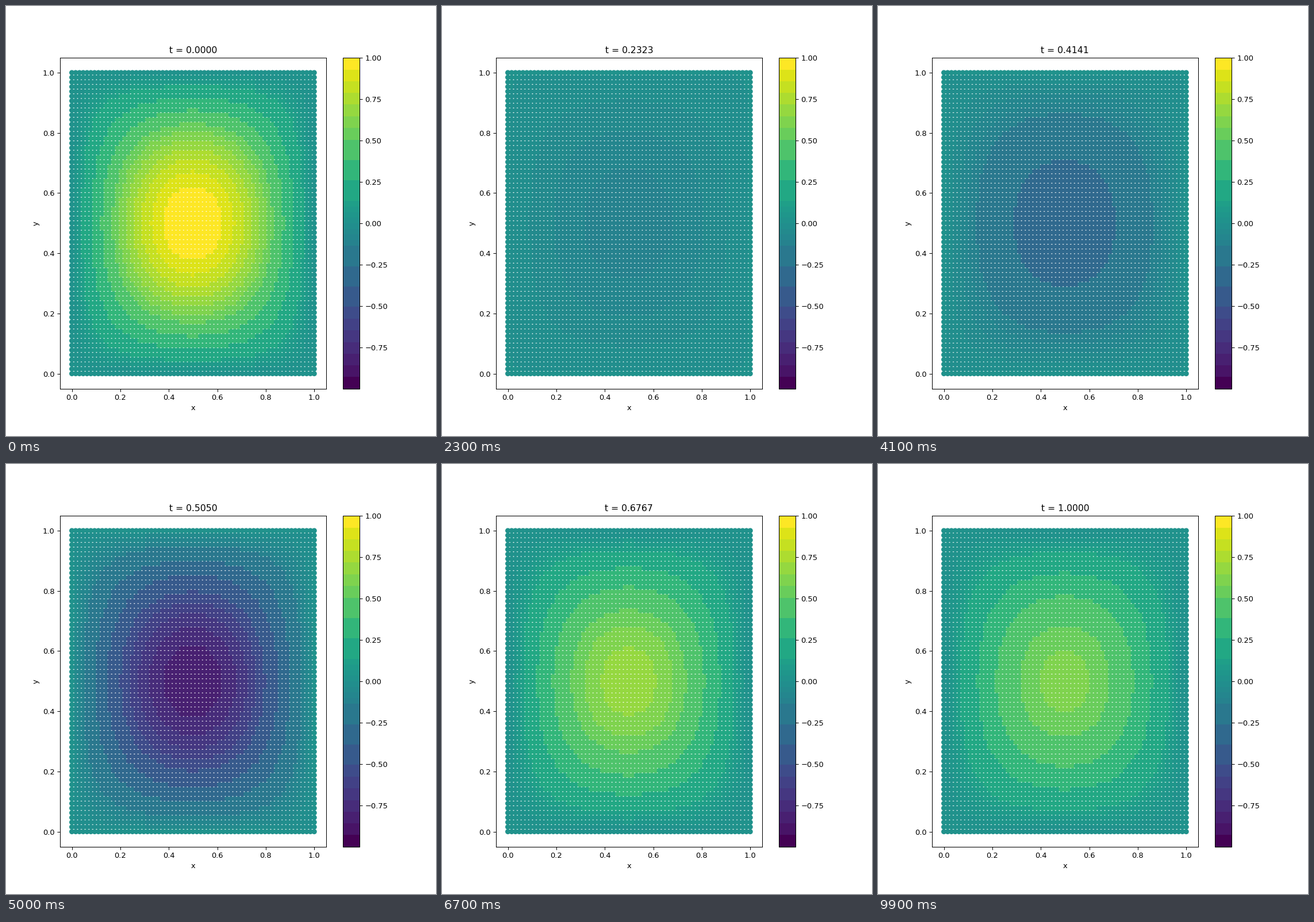
Animation of 748 by 748 pixels, one loop 10 s. Source, as a matplotlib script:

```python
import numpy as np
import matplotlib.pyplot as plt
from matplotlib.animation import FuncAnimation
from matplotlib.colors import ListedColormap, Normalize

FRAMES, INTERVAL = 100, 100
CELLS = 64
OMEGA = 19.77
V_MIN, V_MAX = -0.998, 1.0


def band_edges():
    """Even steps inside a few ranges: fine near zero, coarse beside it."""
    low = np.linspace(0, 0.135, 5)
    mid = np.linspace(0.135, 0.505, 4)
    high = np.linspace(0.505, 1, 8)
    half = np.concatenate([low, mid[1:], high[1:]])
    return np.concatenate([-half[:0:-1], half])


def stepped_viridis(n=1024):
    edges = band_edges()
    mids = (edges[:-1] + edges[1:]) / 2
    mids[0], mids[-1] = V_MIN, V_MAX
    values = np.linspace(V_MIN, V_MAX, n)
    band = np.searchsorted(edges[1:-1], values)
    return ListedColormap(plt.cm.viridis(Normalize(V_MIN, V_MAX)(mids[band])))


def grid_points():
    """Grid nodes with the rim last, so that it is painted on top."""
    j, i = np.divmod(np.arange((CELLS + 1) ** 2), CELLS + 1)
    rim = (i % CELLS == 0) | (j % CELLS == 0)
    order = np.argsort(rim, kind="stable")
    return i[order] / CELLS, j[order] / CELLS


x, y = grid_points()
mode = np.sin(np.pi * x) * np.sin(np.pi * y)

plt.rcParams["font.family"] = "DejaVu Sans"
fig, ax = plt.subplots(figsize=(8, 8), dpi=93.5)
dots = ax.scatter(x, y, c=mode, cmap=stepped_viridis(),
                  vmin=V_MIN, vmax=V_MAX)
fig.colorbar(dots, ax=ax)
ax.set(xlim=(-0.05, 1.05), ylim=(-0.05, 1.05), xlabel="x", ylabel="y")
title = ax.set_title("t = 0.0000")


def update(k):
    t = k * 10000 // (FRAMES - 1) / 10000
    dots.set_array(mode * np.cos(OMEGA * t))
    title.set_text(f"t = {t:.4f}")
    return dots, title


anim = FuncAnimation(fig, update, frames=FRAMES, interval=INTERVAL,
                     repeat=True, repeat_delay=0)
plt.show()
```
